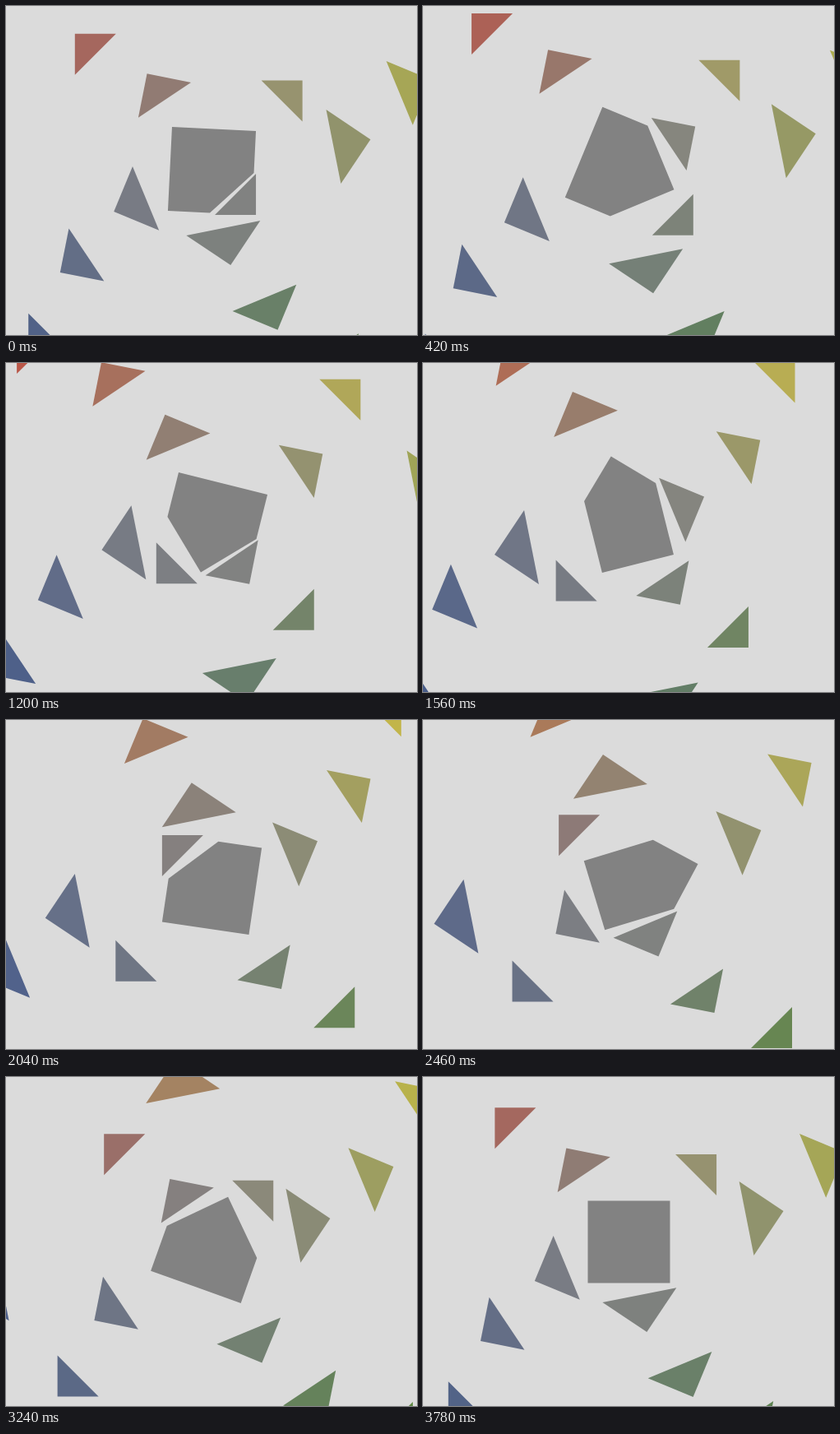
An HTML page with a canvas for the animation above (3840 ms loop, 500 px wide and 400 px high).

```html
<!DOCTYPE html>
<html lang="en">
<head>
<meta charset="utf-8">
<title>Shedding square</title>
<style>
  html, body { margin: 0; height: 100%; overflow: hidden; background: #dbdbdb; }
  canvas { display: block; }
</style>
</head>
<body>
<canvas width="500" height="400"></canvas>
<script>
const ctx = document.querySelector('canvas').getContext('2d');
const STEP = 60;        // ms per tick
const TICKS = 64;       // ticks per loop
const CUT = 4;          // ticks between two cuts
const CYCLE = 4 * CUT;  // ticks until the remainder is a full square again
const SPEED = 5;        // px per tick
const GRAY = 130;

// Heading in degrees, then the change of r, g, b per tick of flight
const tints = [
  [45, -.65, .1, -1.15],
  [70, -1.05, -.1, -1.05],
  [135, -1, -.65, .1],
  [169, -1.2, -.8, .25],
  [225, 1.05, -.82, -1.1],
  [259, 1.25, .05, -1.2],
  [315, 1.25, 1, -1.1],
  [349, .7, .83, -1.05],
  [405, -.65, .1, -1.15]
];

const mod = (a, n) => ((a % n) + n) % n;
const polar = (r, deg) => [r * Math.cos(deg * Math.PI / 180), r * Math.sin(deg * Math.PI / 180)];
const growth = cuts => 2 ** (cuts / 8);
const cornerAngle = (cycle, corner, cuts) => 45 + 90 * (cycle - corner) + 11.25 * cuts;

function fillShape(points, color) {
  ctx.fillStyle = color;
  ctx.beginPath();
  for (const [x, y] of points) ctx.lineTo(x, y);
  ctx.fill();
}

function tint(angle, age) {
  const heading = 45 + mod(angle - 45, 360);
  const i = tints.findIndex(stop => stop[0] > heading);
  const a = tints[i - 1], b = tints[i];
  const mix = (heading - a[0]) / (b[0] - a[0]);
  const rgb = [1, 2, 3].map(c => Math.round(GRAY + age * (a[c] + (b[c] - a[c]) * mix)));
  return `rgb(${rgb})`;
}

function drawPiece(index, age) {
  const k = index % 4;
  const angle = cornerAngle(Math.floor(index / 4), k, k);
  const h = 50 * Math.SQRT1_2 * growth(k);
  const tip = 2 * h + SPEED * age;
  const [c, s] = polar(1, angle);
  const local = [[tip, 0], [tip - h, h], [tip - h, -h]];
  fillShape(local.map(([x, y]) => [x * c - y * s, x * s + y * c]), tint(angle, age));
}

function drawBody(tick) {
  const cuts = (tick % CYCLE) / CUT;
  const size = 50 * growth(cuts);
  const points = [];
  for (let corner = 0; corner < 4; corner++) {
    const angle = cornerAngle(Math.floor(tick / CYCLE), corner, cuts);
    if (corner >= cuts) points.push(polar(size * Math.SQRT2, angle));
    points.push(polar(size, angle - 45));
  }
  fillShape(points, `rgb(${GRAY},${GRAY},${GRAY})`);
}

function draw(ms) {
  const tick = (Math.floor(ms / STEP) + 1) % TICKS;
  ctx.setTransform(1, 0, 0, 1, 0, 0);
  ctx.fillStyle = '#dbdbdb';
  ctx.fillRect(0, 0, 500, 400);
  ctx.translate(250.5, 200.5);
  drawBody(tick);
  for (let i = 0; i < TICKS / CUT; i++) {
    const age = mod(tick - i * CUT, TICKS);
    if (age) drawPiece(i, age);
  }
}

const start = performance.now();
function loop() {
  draw(performance.now() - start);
  requestAnimationFrame(loop);
}
loop();
</script>
</body>
</html>
```
